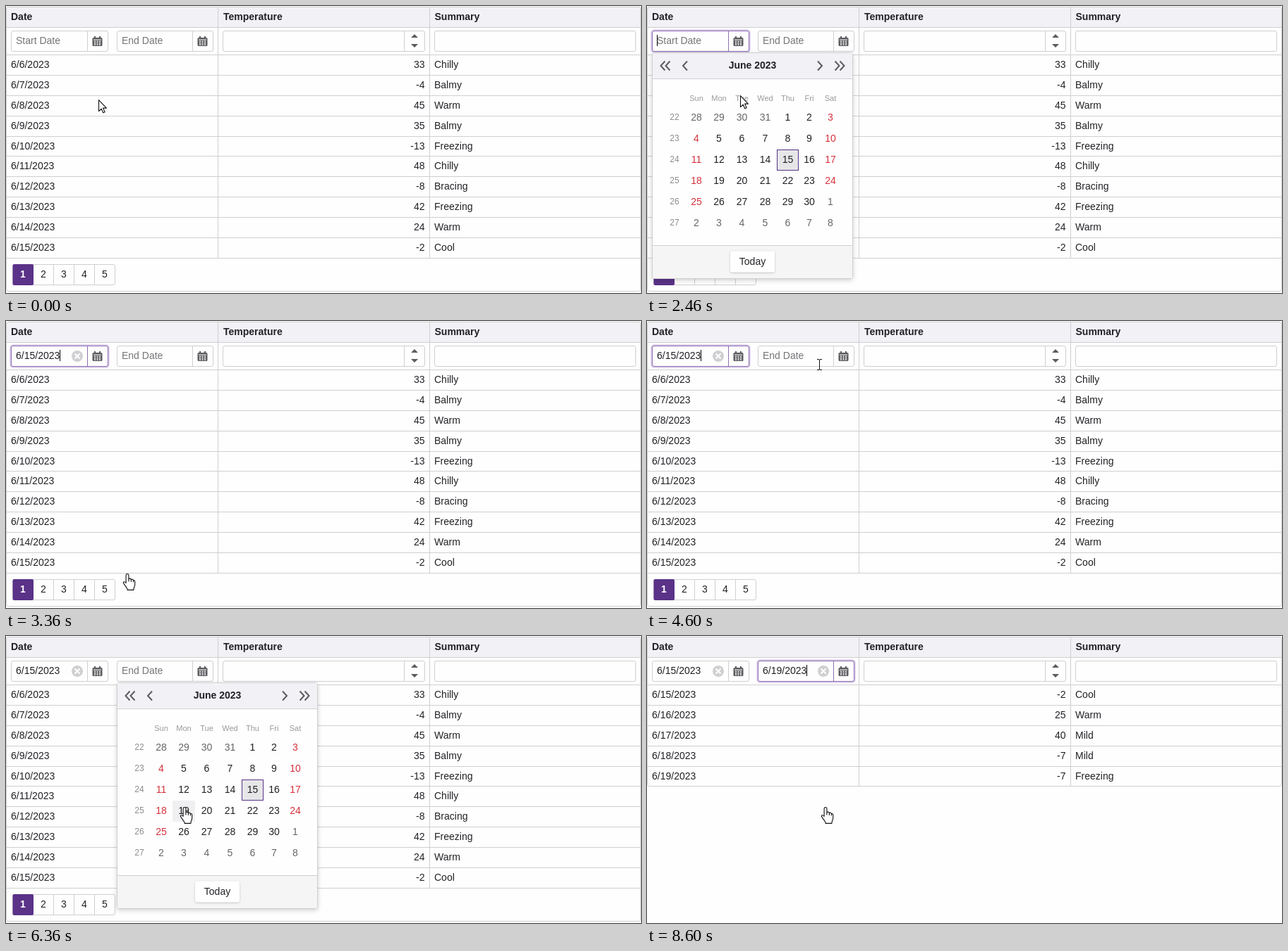
An HTML page for the animation above (8.9 s loop, 900 by 408 pixels).

```html
<!DOCTYPE html>
<html lang="en">
<head>
<meta charset="utf-8">
<title>Date range filter</title>
<style>
  html, body { margin: 0; width: 100%; height: 100%; overflow: hidden; background: #fefefe; }
  svg { display: block; font: 14px "Liberation Sans", Arial, sans-serif; }
  text { fill: #212126; white-space: pre; }
  .bold { font-weight: bold; }
  .hint { fill: #757579; }
  .small { font-size: 11px; fill: #9a9a9e; }
  .week { font-size: 12px; fill: #8c8c90; }
  .other { fill: #66666a; }
  .red { fill: #d6323e; }
  .line { stroke: #cfcfd2; fill: none; }
  .icon { fill: #5c5c60; }
  .chevron { stroke: #5c5c60; stroke-width: 2; fill: none; }
  .focus .line { stroke: #8d6fb5; }
  .ring { fill: none; stroke: #d8cbe8; stroke-width: 2.5; visibility: hidden; }
  .focus .ring { visibility: visible; }
</style>
</head>
<body>
<svg id="stage" width="900" height="408" viewBox="0 0 900 408"></svg>
<script>
const LOOP = 8900, BLINK = 533;
const PURPLE = '#5a3288', HEAD = '#f2f1f5', PAPER = '#fefefe';
const stage = document.getElementById('stage');

function add(parent, tag, attrs = {}, content) {
  const node = document.createElementNS('http://www.w3.org/2000/svg', tag);
  for (const key in attrs) node.setAttribute(key, attrs[key]);
  if (content !== undefined) node.textContent = content;
  parent.appendChild(node);
  return node;
}
const group = (parent, attrs) => add(parent, 'g', attrs);
const path = (parent, d, cls) => add(parent, 'path', { d, class: cls });
const label = (parent, x, y, str, cls = '', anchor = 'start') =>
  add(parent, 'text', { x, y, class: cls, 'text-anchor': anchor }, str);
const rect = (parent, x, y, width, height, attrs) =>
  add(parent, 'rect', { x, y, width, height, ...attrs });
const show = (node, on) => node.setAttribute('visibility', on ? 'inherit' : 'hidden');

// Grid
const rowTop = i => Math.floor(69.8 + 28.83 * i);

function buildRows(firstDay, rows, bottom) {
  const g = group(stage);
  const end = rowTop(rows.length);
  rect(g, .5, 1.5, 899, bottom - 1, { rx: 3, class: 'line' });
  path(g, `M300.5 1.5V${end}M600.5 1.5V${end}M.5 30.5H899.5`, 'line');
  rows.forEach(([degrees, summary], i) => {
    const y = rowTop(i);
    path(g, `M.5 ${y + .5}H899.5`, 'line');
    label(g, 7, y + 19, `6/${firstDay + i}/2023`);
    label(g, 593.5, y + 19, degrees, '', 'end');
    label(g, 607, y + 19, summary);
  });
  return g;
}

function buildPager(parent) {
  path(parent, 'M.5 358.5H899.5', 'line');
  rect(parent, 9.5, 367.5, 145, 29, { rx: 2.5, class: 'line' });
  rect(parent, 9.5, 367, 29.5, 30, { rx: 2, fill: PURPLE });
  for (let i = 0; i < 5; i++) {
    if (i > 1) path(parent, `M${9.5 + 29 * i} 367.5v29`, 'line');
    const num = label(parent, 24 + 29 * i, 386, i + 1, i ? '' : 'bold', 'middle');
    if (!i) num.style.fill = '#fff';
  }
}

path(stage, 'M0 30V5Q0 1 4 1H896Q900 1 900 5V30Z').setAttribute('fill', HEAD);
const allRows = buildRows(6, [
  [33, 'Chilly'], [-4, 'Balmy'], [45, 'Warm'], [35, 'Balmy'], [-13, 'Freezing'],
  [48, 'Chilly'], [-8, 'Bracing'], [42, 'Freezing'], [24, 'Warm'], [-2, 'Cool']
], 405);
buildPager(allRows);
const foundRows = buildRows(15, [
  [-2, 'Cool'], [25, 'Warm'], [40, 'Mild'], [-7, 'Mild'], [-7, 'Freezing']
], 213);
label(stage, 7, 20, 'Date', 'bold');
label(stage, 308, 20, 'Temperature', 'bold');
label(stage, 607.5, 20, 'Summary', 'bold');

// Filter editors
function box(parent, x, width, split) {
  rect(parent, x - 1, 34.5, width + 2, 31, { rx: 4, class: 'ring' });
  rect(parent, x, 35.5, width, 29, { rx: 2.5, class: 'line' });
  if (split) path(parent, `M${split} 35.5v29`, 'line');
}

function buildDateField(x, width, split, hint, value) {
  const g = group(stage);
  box(g, x, width, split);
  const empty = label(g, x + 6.5, 54, hint, 'hint');
  const filled = group(g);
  label(filled, x + 6.5, 54, value);
  const cx = split - 14.5;
  add(filled, 'circle', { cx, cy: 50, r: 8, fill: '#d0d0d2' });
  add(filled, 'path', { d: `M${cx - 3.5} 46.5l7 7m0-7l-7 7`, stroke: '#fff', 'stroke-width': 2 });

  const left = split + 7;
  path(g, `M${left + 2.5} 43h2v2h5v-2h2v2h1q1.5 0 1.5 1.5v9q0 1.5-1.5 1.5h-11q-1.5 0-1.5-1.5v-9q0-1.5 1.5-1.5h1z`, 'icon');
  rect(g, left + 1.5, 47.5, 11, 1, { fill: PAPER });
  for (let i = 0; i < 9; i++)
    rect(g, left + 2.5 + i % 3 * 3.5, 49.7 + Math.floor(i / 3) * 2.3, 2, 1.4, { fill: PAPER });

  const caret = rect(g, 0, 41, 1, 16, { fill: '#000' });
  return { g, empty, filled, caret, x: x + 6.5 };
}

function setField(f, hasValue, focused, caretOn) {
  show(f.empty, !hasValue);
  show(f.filled, hasValue);
  f.g.setAttribute('class', focused ? 'focus' : '');
  f.caret.setAttribute('x', f.x + (hasValue ? 62 : 0));
  show(f.caret, focused && caretOn);
}

const startField = buildDateField(7.5, 137, 115.5, 'Start Date', '6/15/2023');
const endField = buildDateField(157.5, 136, 264.5, 'End Date', '6/19/2023');
box(stage, 307.5, 286, 564.5);
box(stage, 607.5, 285);
path(stage, 'M574 45l5-5 5 5zM574 54h10l-5 5z', 'icon');

// Calendar popup
const EDGES = [54, 86, 118, 151, 184, 215, 245, 275];
const cellMid = c => (EDGES[c] + EDGES[c + 1]) / 2;
const popup = group(stage);
const shadow = 'drop-shadow(0 2px 3px rgba(0,0,0,.18))';

rect(popup, 7.5, 66.5, 284, 321, { rx: 3, fill: PAPER, stroke: '#cfcfd2' }).style.filter = shadow;
rect(popup, 8, 67, 283, 36, { rx: 2, fill: HEAD });
rect(popup, 8, 341, 283, 46, { rx: 2, fill: '#f5f5f5' });
path(popup, 'M8 103.5H291M8 340.5H291', 'line');
path(popup, 'M25.5 78.5l-6 6.5 6 6.5m7-13l-6 6.5 6 6.5M57 78.5l-6 6.5 6 6.5M242 78.5l6 6.5-6 6.5M266.5 78.5l6 6.5-6 6.5m7-13l6 6.5-6 6.5', 'chevron');
label(popup, 149.5, 89, 'June 2023', 'bold', 'middle');
rect(popup, 118, 348.5, 63, 30, { rx: 3, fill: '#fff' }).style.filter =
  'drop-shadow(0 1px 1.5px rgba(0,0,0,.2))';
label(popup, 149.5, 368, 'Today', '', 'middle');

const hover = rect(popup, 0, 0, 0, 30, { fill: '#f0eff2' });
rect(popup, 184.5, 204.5, 30, 29, { fill: '#e6e6e8', stroke: PURPLE });
['Sun', 'Mon', 'Tue', 'Wed', 'Thu', 'Fri', 'Sat'].forEach((name, c) =>
  label(popup, cellMid(c), 135, name, 'small', 'middle'));
for (let r = 0; r < 6; r++) {
  label(popup, 39, 162 + 30 * r, 22 + r, 'week', 'middle');
  for (let c = 0; c < 7; c++) {
    const day = r * 7 + c - 3;
    const inMonth = day > 0 && day <= 30;
    const shown = day < 1 ? day + 31 : inMonth ? day : day - 30;
    const cls = !inMonth ? 'other' : c % 6 === 0 ? 'red' : '';
    label(popup, cellMid(c), 163 + 30 * r, shown, cls, 'middle');
  }
}

function setHover(x, y) {
  const col = EDGES.findIndex((e, i) => x >= e && x < EDGES[i + 1]);
  const row = Math.floor((y - 144) / 30);
  const on = col >= 0 && row >= 0 && row < 6;
  show(hover, on);
  if (on) {
    hover.setAttribute('x', EDGES[col]);
    hover.setAttribute('y', 144 + 30 * row);
    hover.setAttribute('width', EDGES[col + 1] - EDGES[col]);
  }
}

// Pointer
const pointer = group(stage);
const outline = { fill: '#fff', stroke: '#111', 'stroke-width': 1.1, 'stroke-linejoin': 'round' };
const shapes = {
  arrow: add(pointer, 'path', { ...outline, d: 'M.5.7V16.6L4.2 13.1 6.7 18.7 9.1 17.7 6.6 12.1H11.4Z' }),
  hand: add(pointer, 'path', { ...outline, d: 'M-1.9 13V2.4A1.9 1.9 0 0 1 1.9 2.4V11V8.4C2.2 6.6 5 6.8 5.3 8.6V11.5V9C5.8 7.7 8.2 8 8.4 9.6V12V10.3C9 9.2 10.7 9.6 10.7 11.2V15.5C10.7 18.5 9 19.5 8.8 23.4H.2C.2 20.5-3.5 17.5-5.5 13.6C-6.2 11.6-4 10.8-1.9 13.4Z' }),
  beam: add(pointer, 'path', { d: 'M-3-7.5H-1Q.5-7.5.5-6Q.5-7.5 2-7.5H4M.5-6V6M-3 7.5H-1Q.5 7.5.5 6Q.5 7.5 2 7.5H4', fill: 'none', stroke: '#111' })
};

// time, x, y, shape
const MOVES = [
  [0, 131, 133, 'arrow'], [1399, 131, 133, 'arrow'], [1400, 131, 129, 'arrow'],
  [1500, 130, 112, 'arrow'], [1640, 126, 82, 'arrow'], [1735, 124, 64, 'hand'],
  [1860, 122, 55, 'hand'], [2330, 123, 58, 'hand'], [2365, 125, 72, 'arrow'],
  [2460, 132, 126, 'arrow'], [2500, 135, 146, 'hand'], [2720, 150, 258, 'hand'],
  [2840, 158, 324, 'arrow'], [2920, 164, 350, 'hand'], [3130, 172, 358.5, 'hand'],
  [3900, 172, 358.5, 'arrow'], [4050, 184, 310, 'arrow'], [4250, 208, 204, 'arrow'],
  [4450, 232, 104, 'arrow'], [4570, 243, 66, 'beam'], [4600, 244, 62.5, 'beam'],
  [4680, 252, 53, 'beam'], [4760, 258, 48, 'beam'], [4800, 258, 48, 'beam'],
  [4960, 262.5, 48.5, 'beam'], [5100, 262.5, 48.5, 'beam'], [5125, 266, 47, 'hand'],
  [5160, 271, 46, 'hand'], [5730, 271, 46, 'hand'], [5785, 280, 70, 'arrow'],
  [5900, 300, 142, 'hand'], [5970, 306, 178, 'hand'], [6050, 296, 212, 'hand'],
  [6130, 270, 236, 'hand'], [6200, 253, 243, 'hand'], [LOOP, 253, 243, 'hand']
];

function pointerAt(t) {
  const i = MOVES.findIndex(m => m[0] > t) - 1;
  const [t0, x0, y0, shape] = MOVES[i], [t1, x1, y1] = MOVES[i + 1];
  const k = (t - t0) / (t1 - t0);
  return { x: x0 + (x1 - x0) * k, y: y0 + (y1 - y0) * k, shape };
}

function draw(t) {
  const within = (a, b) => t >= a && t < b;
  const blink = from => Math.floor((t - from) / BLINK) % 2 === 0;

  const hasStart = t >= 3360, hasEnd = t >= 6460;
  setField(startField, hasStart, within(2060, 3260) || within(3360, 5300), blink(hasStart ? 3360 : 2060));
  setField(endField, hasEnd, within(5300, 6360) || hasEnd, blink(hasEnd ? 6460 : 5300));
  show(allRows, !hasEnd);
  show(foundRows, hasEnd);

  const p = pointerAt(t);
  // The hand stays over the old spot until the mouse moves again.
  if (within(3130, 3900)) p.shape = 'hand';
  const dx = t < 4000 ? 0 : 150;
  const open = within(2100, 3360) || within(5330, 6460);
  show(popup, open);
  popup.setAttribute('transform', `translate(${dx})`);
  if (open) setHover(p.x - dx, p.y);
  else show(hover, false);

  pointer.setAttribute('transform', `translate(${Math.round(p.x)} ${Math.round(p.y)})`);
  for (const name in shapes) show(shapes[name], name === p.shape);
}

const began = performance.now();
function tick() {
  draw((performance.now() - began) % LOOP);
  requestAnimationFrame(tick);
}
tick();
</script>
</body>
</html>
```
